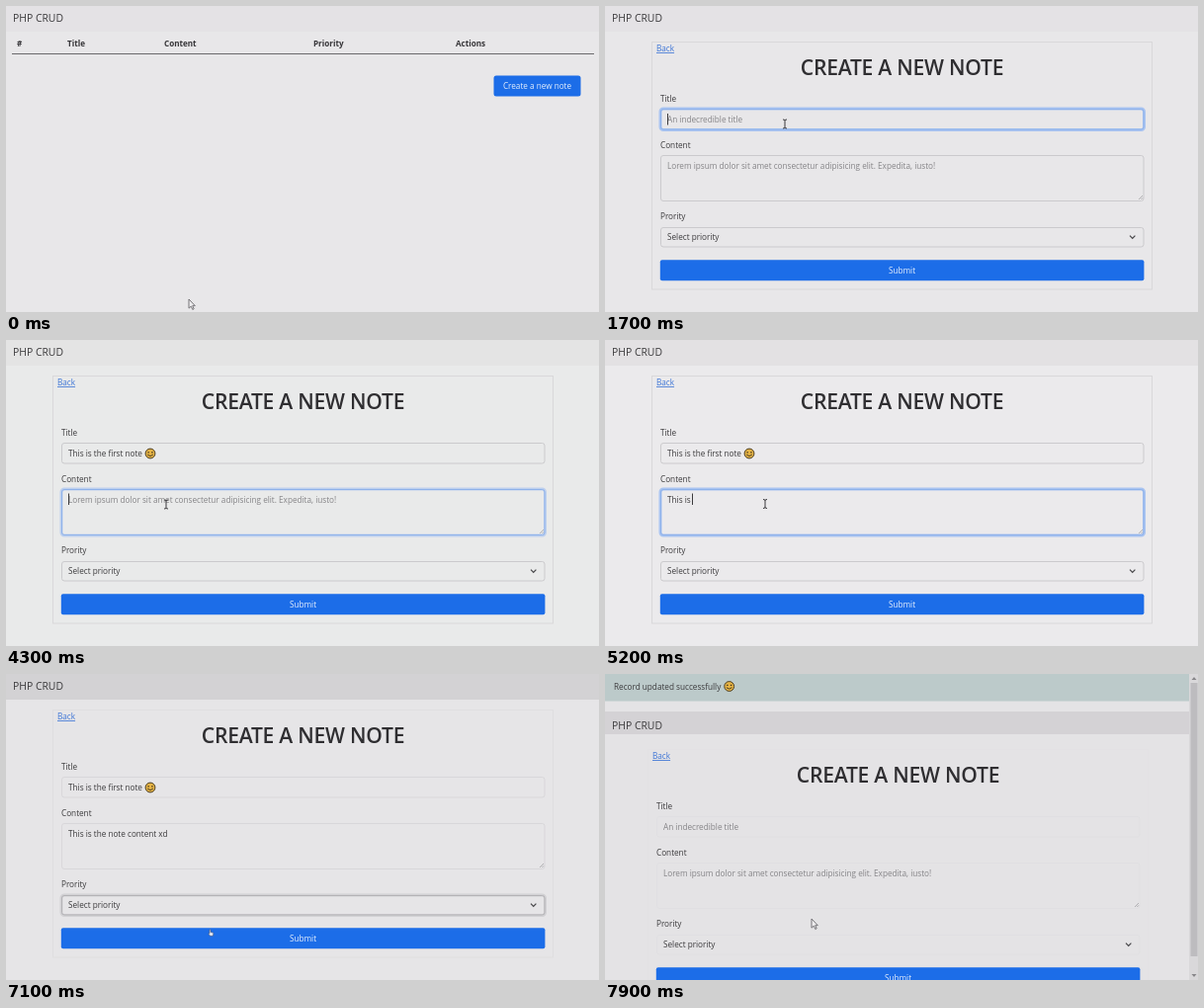
These frames come from a looping animation (600 px wide and 310 px high, 8000 ms). An HTML page:

```html
<!DOCTYPE html>
<html lang="en">
<head>
<meta charset="utf-8">
<title>PHP CRUD</title>
<style>
  html, body { margin: 0; width: 100%; height: 100%; overflow: hidden; }
  svg { display: block; width: 600px; height: 310px; }
  text { font: 8.2px "Open Sans", "Noto Sans", sans-serif; fill: #3c3b3d; white-space: pre; }
  .brand { font-size: 10.4px; }
  .head { font-weight: 700; font-size: 8.1px; fill: #363538; }
  .title { font-size: 21.1px; font-weight: 600; letter-spacing: -.25px; fill: #2f2e31; }
  .hint { fill: #858487; }
  .link { fill: #3c74d6; text-decoration: underline; }
  .light { fill: #e4eefc; }
  .mid { text-anchor: middle; }
  .field { fill: none; stroke: #cbcacd; }
  .halo { fill: none; stroke-width: 3; opacity: 0; }
  .btn { fill: #1c6de8; }
</style>
</head>
<body>
<svg viewBox="0 0 600 310">
  <defs>
    <g id="face">
      <circle r="4.9" fill="#e6b445" stroke="#4a3c22"/>
      <path d="M-2.6-1.2h1.4M1.2-1.2h1.4" stroke="#3c301d" stroke-width="1.3"/>
      <path d="M-2.8 1.2q2.8 2.8 5.6 0" fill="none" stroke="#4a3c22"/>
    </g>
  </defs>
  <rect id="bg" width="600" height="310"/>
  <g id="bar">
    <rect id="nav" width="600" height="26"/>
    <text class="brand" x="7" y="16">PHP CRUD</text>
  </g>

  <g id="list">
    <text class="head" x="11" y="41">#</text>
    <text class="head" x="62" y="41">Title</text>
    <text class="head" x="160" y="41">Content</text>
    <text class="head" x="311" y="41">Priority</text>
    <text class="head" x="455" y="41">Actions</text>
    <path d="M6 48.5H595" stroke="#6b6a6d"/>
    <rect class="btn" x="493.5" y="70.5" width="88" height="21" rx="2.5"/>
    <text class="light mid" x="537.5" y="84">Create a new note</text>
  </g>

  <g id="form">
    <rect id="card" x="47.5" y="36.5" width="506" height="250.5" fill="none" stroke="#d9d8da"/>
    <text class="link" x="52" y="46">Back</text>
    <text class="title mid" x="300.5" y="70.2">CREATE A NEW NOTE</text>

    <text x="56" y="97">Title</text>
    <rect id="halo1" class="halo" x="56" y="104" width="489.5" height="21.5" rx="3" stroke="#a9c4f1"/>
    <rect id="box1" class="field" x="56.5" y="104.5" width="488.5" height="20.5" rx="2.5"/>
    <text id="hint1" class="hint" x="63" y="118">An indecredible title</text>
    <text id="val1" x="63" y="118"></text>
    <use id="smile" href="#face" x="146" y="115"/>

    <text x="56" y="143.5">Content</text>
    <rect id="halo2" class="halo" x="56" y="151" width="489.5" height="47" rx="3" stroke="#a9c4f1"/>
    <rect id="box2" class="field" x="56.5" y="151.5" width="488.5" height="46" rx="2.5"/>
    <path d="M540 196l4-4M542.3 196l1.7-1.7" stroke="#a3a2a5" stroke-width=".8"/>
    <text id="hint2" class="hint" x="63" y="164.5">Lorem ipsum dolor sit amet consectetur adipisicing elit. Expedita, iusto!</text>
    <text id="val2" x="63" y="164.5"></text>
    <path id="caret" d="M.5 0v11.5" stroke="#3c3b3d"/>

    <text x="56" y="216">Prority</text>
    <rect id="halo3" class="halo" x="56" y="224" width="489.5" height="20.5" rx="3" stroke="#d2d1d4"/>
    <rect id="box3" class="field" x="56.5" y="224.5" width="488.5" height="19.5" rx="2.5"/>
    <text x="63" y="237">Select priority</text>
    <path d="M531 232.6l2.7 2.7 2.7-2.7" fill="none" stroke="#454447" stroke-width="1.2"/>

    <rect class="btn" x="55.8" y="257.2" width="489.6" height="21" rx="2"/>
    <text class="light mid" x="300.5" y="271">Submit</text>
  </g>

  <g id="alert">
    <rect width="591" height="27.5" fill="#bccaca"/>
    <text x="9" y="15.5">Record updated successfully</text>
    <use href="#face" x="125.7" y="12.5"/>
    <rect x="591" width="9" height="310" fill="#d9d8da"/>
    <rect x="592.5" y="9" width="7" height="277" fill="#bdbcbf"/>
    <path d="M593.5 6l2.5-3 2.5 3zM593.5 304l2.5 3 2.5-3z" fill="#88878a"/>
  </g>

  <path id="arrow" d="M0 0V9.2L2.2 7.2 3.8 10.5 5.2 9.8 3.7 6.7H6.3Z" fill="#eeedef" stroke="#69686b" stroke-width=".9"/>
  <path id="beam" d="M-2-4.5Q0-4.5 0-3.5 0-4.5 2-4.5M0-4V4M-2 4.5Q0 4.5 0 3.5 0 4.5 2 4.5" fill="none" stroke="#3a393c"/>
  <path id="hand" d="M0 0q.9-.5 1 .5V2.5l2.2.6q.7.2.6 1L3.4 6.3H.4L-1.2 4.1q0-.7 1.1-.1Z" fill="#e3e9f4" stroke="#4a5877" stroke-width=".6"/>
</svg>
<script>
const $ = id => document.getElementById(id);
const LOOP = 8000, OPEN = 500, FOCUS = [1500, 4200, 6700], SENT = 7700;

// time, x, y
const path = [
  [0, 185, 297], [100, 210, 279], [400, 532, 80], [500, 532, 80],
  [800, 187, 161], [1100, 187, 161], [1400, 182, 119.5], [3800, 182, 119.5],
  [4100, 162, 167], [4500, 162, 166], [6500, 162, 166], [6700, 150, 236],
  [6800, 150, 236], [7100, 206, 259], [7400, 210, 260], [7900, 209, 248]
];
// time, page colour, bar colour, border strength
const looks = [
  [0, '#e8e7e9', '#e4e2e5', 1], [3700, '#e9eaea', '#e4e4e4', 1],
  [4800, '#ebeaec', '#e3e1e3', 1], [6500, '#e6e5e7', '#d3d2d4', .5],
  [SENT, '#e4e3e5', '#d4d2d5', .15]
];
const clamp = v => Math.max(0, Math.min(1, v));
const ease = v => v * v * (3 - 2 * v);
const show = (id, on) => $(id).style.display = on ? '' : 'none';

function pointAt(t) {
  const i = path.findIndex(p => p[0] > t);
  if (i < 0) return path[path.length - 1].slice(1);
  const a = path[i - 1], b = path[i];
  const k = ease((t - a[0]) / (b[0] - a[0]));
  return [a[1] + (b[1] - a[1]) * k, a[2] + (b[2] - a[2]) * k];
}

const typed = (text, t, from, to) =>
  text.slice(0, Math.round(text.length * clamp((t - from) / (to - from))));

function focus(n, t, strength) {
  const from = FOCUS[n - 1], to = FOCUS[n] || 7400;
  const k = t < to ? clamp((t - from) / 150) : 0;
  const box = $('box' + n).style;
  $('halo' + n).style.opacity = k;
  box.stroke = k ? (n < 3 ? '#8fb2ea' : '#b4b3b6') : '#cbcacd';
  box.opacity = k ? 1 : strength;
}

function cursor(t) {
  const [x, y] = pointAt(t);
  const overButton = t < OPEN ? t >= 400 : y > 257 && t < SENT;
  const overText = t >= 700 && t < 6600;
  const kind = overButton ? 'hand' : overText ? 'beam' : 'arrow';
  for (const id of ['arrow', 'beam', 'hand']) show(id, id === kind);
  $(kind).setAttribute('transform', `translate(${x} ${y})`);
}

function draw(t) {
  const sent = t >= SENT;
  const [, page, bar, strength] = looks.filter(s => s[0] <= t).pop();
  $('bg').setAttribute('fill', page);
  $('nav').setAttribute('fill', bar);
  $('nav').setAttribute('y', sent ? -2 : 0);
  $('nav').setAttribute('height', sent ? 23 : 26);
  $('bar').setAttribute('transform', `translate(0 ${sent ? 40 : 0})`);
  $('form').setAttribute('transform', sent ? 'translate(-4 40)' : '');
  $('card').style.opacity = strength;
  show('list', t < OPEN);
  show('form', t >= OPEN);
  show('alert', sent);

  const title = sent ? '' : typed('This is the first ', t, 1800, 2900) + typed('note ', t, 2900, 3300);
  const body = sent ? '' : typed('This is the note content', t, 4700, 6150) + typed(' xd', t, 6200, 6500);
  $('val1').textContent = title;
  $('val2').textContent = body;
  show('hint1', !title);
  show('hint2', !body);
  show('smile', t >= 3600 && !sent);
  for (const n of [1, 2, 3]) focus(n, t, strength);

  const inBody = t >= FOCUS[1];
  const active = t >= FOCUS[0] && t < FOCUS[2];
  show('caret', active);
  if (active) {
    const wide = $(inBody ? 'val2' : 'val1').getComputedTextLength();
    const extra = !inBody && t >= 3600 ? 12 : 0;
    $('caret').setAttribute('transform', `translate(${Math.round(62.5 + wide + extra)} ${inBody ? 155.5 : 109})`);
  }
  cursor(t);
}

let start;
function tick(now) {
  start ??= now;
  draw(Math.floor((now - start) % LOOP / 100) * 100);
  requestAnimationFrame(tick);
}
draw(0);
requestAnimationFrame(tick);
</script>
</body>
</html>
```
